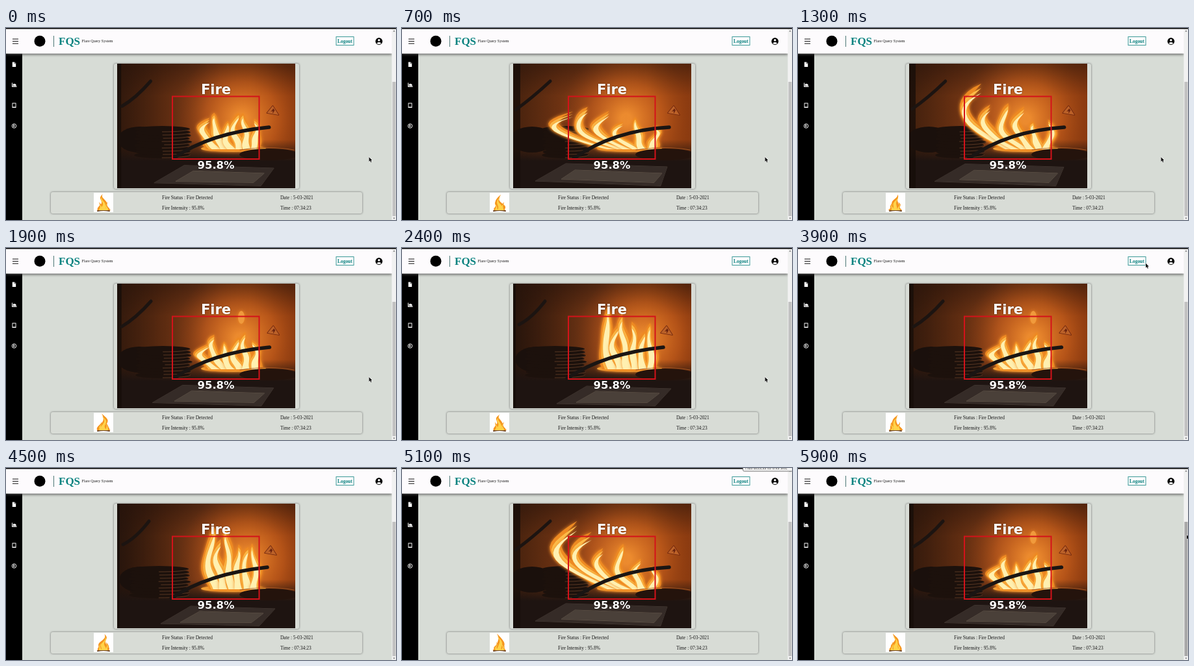
An HTML page with a canvas that plays this animation: 600x296 px, repeating every 6000 ms.

```html
<!DOCTYPE html>
<html lang="en">
<head>
<meta charset="utf-8">
<title>Fire monitor</title>
<style>
  html, body { margin: 0; width: 600px; height: 296px; overflow: hidden; background: #d7dcd6; }
  svg, canvas { position: absolute; left: 0; top: 0; display: block; }
  text { font: 7.45px "Liberation Serif", serif; fill: #151515; }
  .brand { font-size: 17px; font-weight: bold; fill: #0b8380; }
  .tag { font-size: 6px; }
  .logout { font-weight: bold; fill: #0b8380; }
  .card { fill: #d8dcd6; filter: drop-shadow(0 0 1.7px #666); }
</style>
</head>
<body>
<svg width="600" height="296">
  <rect width="600" height="296" fill="#d7dcd6"/>
  <rect class="card" x="166" y="55" width="285" height="193" rx="3"/>
  <rect class="card" x="69" y="253" width="479" height="33" rx="3"/>
  <rect y="39" width="25" height="257"/>
  <rect width="594" height="39.5" fill="#fdfbfd" style="filter:drop-shadow(0 1px 2px #444)"/>
  <rect x="593.5" width="6.5" height="296" fill="#f1f1f1"/>
  <rect id="thumb" x="594.5" y="83" width="5" height="207" fill="#c1c1c1"/>
  <path d="M595.5 5.5l1.5-2 1.5 2zM595.5 292.5l1.5 2 1.5-2z" fill="#666"/>
  <rect width="600" height="1.5"/>

  <path d="M10 17h9M10 20.5h9M10 24h9" stroke="#111" stroke-width="1.2"/>
  <circle cx="52" cy="20.3" r="8.5"/>
  <path d="M73.5 12v17" stroke="#4d7775"/>
  <text class="brand" x="81" y="26">FQS</text>
  <text class="tag" x="116.5" y="22">Flare Query System</text>
  <rect x="508" y="13.5" width="27" height="13" fill="none" stroke="#3b9997"/>
  <text class="logout" x="510" y="23">Logout</text>
  <circle cx="573.8" cy="20.5" r="5.4"/>
  <circle cx="573.8" cy="18.7" r="1.7" fill="#fff"/>
  <path d="M570.3 23.4q3.5-3.4 7 0q-3.5 3-7 0" fill="#fff"/>

  <g fill="#fff">
    <path d="M9.8 52.5h3.4l2 2v5.5H9.8z"/>
    <path d="M13 52.5v2.2h2.2" stroke="#000" stroke-width=".6" fill="none"/>
    <path d="M9 84.5v6.5h7.5v-1H10v-5.5zM10.6 89.4v-2.2l1.6-1.8 1.6 1.4 1-.8 1.4 3.4z"/>
    <path fill-rule="evenodd" d="M9.5 115.5h6v7.5h-6zM10.4 116.4v5h4.2v-5z"/>
  </g>
  <circle cx="12.5" cy="151" r="3.3" fill="none" stroke="#fff" stroke-width=".9"/>
  <path d="M11.4 153v-4h1.2q1.3 1.1 0 2h-1.2m1.1 0l1.1 2" fill="none" stroke="#fff" stroke-width=".8"/>

  <text x="240" y="263.5">Fire Status : Fire Detected</text>
  <text x="240" y="279.5">Fire Intensity : 95.8%</text>
  <text x="422" y="263.5">Date : 5-03-2021</text>
  <text x="422" y="279.5">Time : 07:34:23</text>
</svg>
<canvas id="view" width="600" height="296"></canvas>
<script>
const ctx = document.getElementById('view').getContext('2d');
const thumb = document.getElementById('thumb');
const LOOP = 6000, STEP = 100, CLIP = 2000, CUT = 700;

const clamp = u => Math.max(0, Math.min(1, u));
const mix = (a, b, u) => a + (b - a) * u;
const ease = u => u * u * (3 - 2 * u);

function gradient(g, ...colors) {
  colors.forEach((c, i) => g.addColorStop(i / (colors.length - 1), c));
  return g;
}

function ellipse(x, y, rx, ry, fill) {
  ctx.beginPath();
  ctx.ellipse(x, y, rx, ry, 0, 0, 7);
  ctx.fillStyle = fill;
  ctx.fill();
}

function line(points, fill, stroke, width = 1) {
  ctx.beginPath();
  points.forEach(p => ctx.lineTo(...p));
  ctx.closePath();
  ctx.lineWidth = width;
  ctx.strokeStyle = stroke;
  if (stroke) ctx.stroke();
  ctx.fillStyle = fill;
  ctx.fill();
}

function curve(x, y, cx, cy, tx, ty, width, color) {
  ctx.beginPath();
  ctx.moveTo(x, y);
  ctx.quadraticCurveTo(cx, cy, tx, ty);
  ctx.lineWidth = width;
  ctx.strokeStyle = color;
  ctx.stroke();
}

// A wavering tongue: its spine leans left, curls back near the tip and thins out
function flame({ x, y, h, w, lean = 0, phase, taper }, scale, color) {
  const left = [], right = [];
  for (let u = 0; u <= 1.001; u += 1 / 16) {
    const v = Math.min(u, 1);
    const cx = x - lean * Math.sin(v * 2.4) + Math.sin(v * 6 - phase) * w * .22 * v;
    const cy = y - h * v * mix(.75, 1, scale);
    const edge = side => w / 2 * scale * (1 - v) ** taper * (1 + .25 * Math.sin(v * 9 - phase * 1.7 + side));
    left.push([cx - edge(0), cy]);
    right.unshift([cx + edge(2), cy]);
  }
  line([...left, ...right], color);
}

function burn(tongues, ...layers) {
  for (const [scale, color] of layers) tongues.forEach(t => flame(t, scale, color));
}

function backdrop(at, z) {
  ctx.fillStyle = gradient(ctx.createLinearGradient(171, 0, 445, 0), '#55280f', '#793713', '#91451a', '#a04b17', '#8a3a10');
  ctx.fillRect(171, 55, 274, 192);
  ctx.fillStyle = gradient(ctx.createLinearGradient(171, 0, 330, 0), `rgba(28,16,11,${.25 + .55 * z})`, 'rgba(28,16,11,0)');
  ctx.fillRect(171, 55, 274, 192);
  ctx.fillStyle = gradient(ctx.createLinearGradient(0, 55, 0, 105), 'rgba(38,18,10,.55)', 'rgba(38,18,10,0)');
  ctx.fillRect(171, 55, 274, 50);
  ctx.fillStyle = gradient(ctx.createRadialGradient(at(345, 370), 140, 8, at(345, 372), 138, 105), 'rgba(250,150,50,.85)', 'rgba(220,105,30,.45)', 'rgba(140,55,12,0)');
  ctx.fillRect(171, 55, 274, 192);
  ctx.fillStyle = gradient(ctx.createLinearGradient(0, 172, 0, 205), 'rgba(28,17,13,0)', '#1e1411');
  ctx.fillRect(171, 172, 274, 75);
  ctx.fillStyle = 'rgba(20,12,9,.75)';
  ctx.fillRect(171, 55, at(11, 4), 192);
}

function dishes(at) {
  ctx.lineCap = 'round';
  curve(at(175, 180), at(126, 118), 200, 108, at(228, 220), 82, 5, '#1c1411');
  ellipse(at(200, 208), 172, 34, 20, '#1a100c');
  for (let y = 196; y >= 152; y -= 5) {
    const right = at(291, 285) - Math.abs(Math.sin(y)) * 4, rx = at(36, 46);
    ellipse(right - rx, y, rx, 5, '#1c110c');
    curve(right - rx, y + 4, right - 6, y + 4, right, y, .8, 'rgba(165,105,65,.55)');
  }
}

function sign(x, y) {
  ctx.lineJoin = 'round';
  line([[x - 9, y + 4], [x, y - 7], [x + 9, y + 7]], '#bb6128', '#6b240e', 1.6);
  line([[x + 1, y - 3], [x - 3, y + 2], [x, y + 1], [x, y + 5], [x + 3, y]], '#6b240e');
}

function fire(s, z) {
  const swell = 75 + 28 * Math.cos((s - 1100) / 1500 * 2 * Math.PI);
  const lean = 75 * (1 - z) ** 2 + 12;
  const tongues = Array.from({ length: 6 }, (_, i) => ({
    x: 324 + 11.5 * i,
    y: 187,
    h: mix(swell, 40 + 26 * z, i / 5) * (.92 + .14 * Math.sin(i * 2.3 + s / 160)),
    w: 25 - i,
    lean: lean * (1 - i / 4.5),
    phase: s / 110 + i * 1.9,
    taper: .55
  }));
  ctx.save();
  ctx.shadowColor = '#f08a20';
  ctx.shadowBlur = 5;
  ellipse(350, 186, 50, 5, '#f3a034');
  burn(tongues, [1.1, '#ee8a22'], [.82, '#fdbd4a'], [.52, '#fff0b0']);
  if (s >= 1800 && s < 2000) ellipse(362, 107, 5, 10, '#f09a3c');
  ctx.restore();
}

function cooker(at) {
  ellipse(405, 195, 46, 9, '#24130c');
  curve(360, 188, 405, 181, 443, 188, 1.2, '#a3541f');
  line([[at(205, 238), at(236, 240)], [at(252, 284), at(209, 213)], [at(408, 414), at(214, 217)], [at(398, 390), 243]], '#352b27', '#463b35');
  line([[at(245, 268), at(233, 238)], [at(266, 298), at(219, 221)], [at(400, 396), 224], [at(388, 378), 238]], '#4a4039', '#625549');
  curve(at(264, 254), 201, at(325, 310), at(158, 163), at(411, 402), 153, 5.5, '#1a1513');
}

function label(text, size, y) {
  ctx.font = `bold ${size}px "DejaVu Sans", sans-serif`;
  ctx.fillText(text, 323, y);
}

function video(s) {
  const z = clamp((s - 1100) / 1300), at = (a, b) => mix(a, b, z);
  ctx.save();
  ctx.beginPath();
  ctx.rect(171, 55, 274, 192);
  ctx.clip();
  backdrop(at, z);
  dishes(at);
  sign(at(418, 407), 127);
  fire(s, z);
  cooker(at);

  ctx.lineWidth = 2;
  ctx.lineJoin = 'miter';
  ctx.strokeStyle = '#d4121a';
  ctx.strokeRect(256, 105.5, 133.5, 96.5);
  ctx.fillStyle = '#fff';
  ctx.textAlign = 'center';
  ctx.shadowColor = '#0008';
  ctx.shadowBlur = 2;
  label('Fire', 21, 102);
  label('95.8%', 16.4, 217);
  ctx.restore();
}

function campfire(t) {
  ctx.fillStyle = '#fff';
  ctx.fillRect(135, 254, 30, 30);
  ctx.lineCap = 'round';
  curve(141, 282, 150, 280, 159, 282, 2, '#6d4527');
  const phase = t / 130, body = { x: 150, y: 281, h: 25 + Math.sin(phase), w: 18, phase, taper: 1.1 };
  const sides = [-5, 5].map(d => ({ ...body, x: 150 + d, h: 13, w: 8, phase: phase + d }));
  burn([body, ...sides], [1, '#f5951f'], [.45, '#ffd34a']);
}

function pointer(x, y) {
  ctx.save();
  ctx.translate(x, y);
  line([[0, 0], [0, 7], [1.6, 5.6], [2.8, 8.2], [3.9, 7.6], [2.8, 5.2], [4.8, 5]], '#111', '#fff');
  ctx.restore();
}

function tooltip() {
  ctx.beginPath();
  ctx.roundRect(524.5, -10, 80, 15, 2);
  ctx.fillStyle = '#f2f2f2';
  ctx.fill();
  ctx.lineWidth = 1;
  ctx.strokeStyle = '#777';
  ctx.stroke();
  ctx.fillStyle = '#333';
  ctx.font = '6.4px "Open Sans", sans-serif';
  ctx.fillText('Has access to this site', 528, 2);
}

function draw(now) {
  const t = Math.floor(now % LOOP / STEP) * STEP;
  ctx.clearRect(0, 0, 600, 296);
  video((t - CUT + CLIP) % CLIP + CUT);
  campfire(t);

  // the pointer goes up to the button, then out at the top right
  const up = ease(clamp((t - 3500) / 400)), out = clamp((t - 3900) / 200);
  if (t < 4200) pointer(558.5 - 23.5 * up + 52 * out, 199 - 175.5 * up - 18.5 * out);
  if (t >= 5000 && t < 5500) tooltip();

  const onScrollbar = t >= 5700;
  if (onScrollbar) pointer(598, 103);
  thumb.setAttribute('fill', onScrollbar ? '#a8a8a8' : '#c1c1c1');
}

const start = performance.now();
function tick() {
  draw(performance.now() - start);
  requestAnimationFrame(tick);
}
tick();
</script>
</body>
</html>
```
